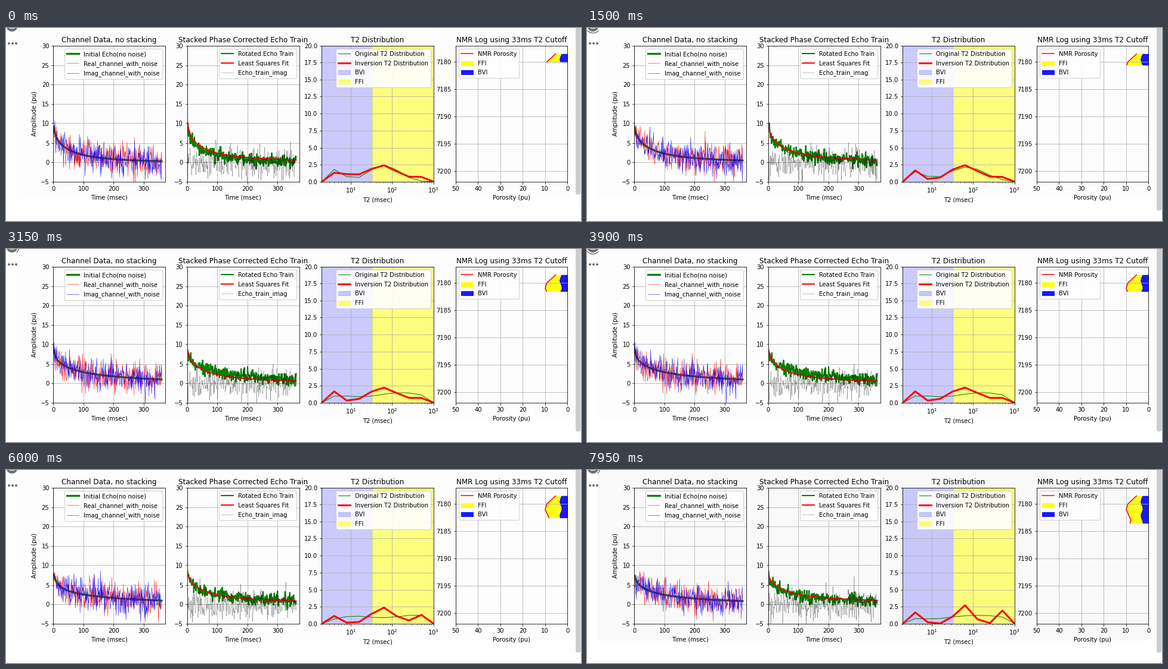
A matplotlib script that plays this animation: 964 px wide and 325 px high, repeating every 8 s.

```python
import numpy as np
import matplotlib.pyplot as plt
from matplotlib.animation import FuncAnimation
from matplotlib.patches import Arc, Circle, FancyBboxPatch, Rectangle
from matplotlib.transforms import IdentityTransform

W, H, DPI = 964, 325, 72
LOOP, TICK, STEP = 8000, 50, 150
FIRST_CHANGE, PERIOD = 700, 1075
STATES = 8

plt.rcParams.update({
    "font.family": "DejaVu Sans",
    "font.size": 10,
    "axes.titlesize": 12,
    "axes.labelpad": 4.7,
    "legend.labelspacing": 0.56,
    "legend.framealpha": 0.9,
    "toolbar": "None",
})

T2 = 2.0 ** np.arange(1, 11)
BINS = np.arange(8)
ECHO_TIME = 1.2 * np.arange(1, 301)

# Two humps of the true spectrum: height, bin and width of each, at key depths
KEY_STATES = [0, 2, 4, 6, 7]
KEY_HUMPS = np.array([
    [1.8, 0, 0.7, 2.5, 4, 1.2],
    [1.1, 0, 0.8, 1.85, 4.3, 1.7],
    [0.7, 0.5, 2, 1.15, 6.5, 2.8],
    [1.35, 2.3, 1.1, 1.4, 7, 1.9],
    [0.45, 0, 0.8, 1.25, 5, 3],
])


def hump(height, center, width):
    return height * np.exp(-((BINS - center) / width) ** 2 / 2)


def with_ends(amps):
    return np.concatenate(([0], amps, [0]))


def true_spectrum(k):
    p = [np.interp(k, KEY_STATES, column) for column in KEY_HUMPS.T]
    return with_ends(hump(*p[:3]) + hump(*p[3:]))


def fitted_spectrum(k):
    sharp = np.clip((k - 4) / 2, 0, 1)
    fast = hump(1.5 + 0.35 * np.cos(np.pi * (k - 2) / 3), 0, 0.5 + 0.9 * np.exp(-3 * k))
    middle = hump(2.4 + 0.06 * k * np.cos(np.pi * (k - 6.5) / 3), 3.9, 1.15 - 0.5 * sharp)
    slow = hump(0.65 + 1.3 * sharp, 7, 0.8 - 0.4 * sharp)
    return with_ends(fast + middle + slow)


def decay(spectrum):
    return np.exp(-ECHO_TIME[:, None] / T2) @ spectrum


def panel(fig, col, shade, title, xlabel):
    rect = [(79.4 + 224.5 * col) / W, (H - 258.9) / H, 187.1 / W, 227.9 / H]
    ax = fig.add_axes(rect, facecolor=shade)
    ax.set_title(title)
    ax.set_xlabel(xlabel)
    ax.grid(True)
    return ax


def time_axis(ax):
    ax.set(xlim=(0, 371), ylim=(-5, 30))
    ax.set_xticks([0, 100, 200, 300])
    ax.set_yticks(range(-5, 31, 5))
    ax.legend(loc="upper right")


def draw_plots(fig, k):
    rng = np.random.default_rng(40 + k)
    shade = "#fdfdfd" if k < 6 else "#f9f9f9"
    fig.add_artist(Rectangle((18, 38), 927, 287, color=shade, lw=0, zorder=-1,
                             transform=IdentityTransform()))

    def noise(sigma):
        return rng.normal(0, sigma, ECHO_TIME.size)

    true, fitted = true_spectrum(k), fitted_spectrum(k)
    echo = decay(true)

    ax = panel(fig, 0, shade, "Channel Data, no stacking", "Time (msec)")
    ax.set_ylabel("Amplitude (pu)")
    ax.plot(ECHO_TIME, echo, color="green", lw=3.2, label="Initial Echo(no noise)")
    ax.plot(ECHO_TIME, echo + noise(2), color="red", lw=0.5,
            label="Real_channel_with_noise")
    ax.plot(ECHO_TIME, echo + noise(2), color="blue", lw=0.5,
            label="Imag_channel_with_noise")
    time_axis(ax)

    ax = panel(fig, 1, shade, "Stacked Phase Corrected Echo Train", "Time (msec)")
    ax.plot(ECHO_TIME, echo + noise(0.8), color="green", lw=2.1,
            label="Rotated Echo Train")
    ax.plot(ECHO_TIME, decay(fitted), color="red", lw=2, label="Least Squares Fit")
    ax.plot(ECHO_TIME, noise(2), color="black", lw=0.6, ls=":",
            label="Echo_train_imag")
    time_axis(ax)

    ax = panel(fig, 2, shade, "T2 Distribution", "T2 (msec)")
    ax.set_xscale("log")
    ax.plot(T2, true, color="green", lw=1, label="Original T2 Distribution")
    ax.plot(T2, fitted, color="red", lw=3, label="Inversion T2 Distribution")
    ax.axvspan(2, 33, color="blue", alpha=0.2, label="BVI")
    ax.axvspan(33, 1000, color="yellow", alpha=0.5, label="FFI")
    ax.set(xlim=(2, 1000), ylim=(0, 20))
    ax.set_yticks(np.arange(0, 20.1, 2.5))
    ax.legend(loc="upper right")

    ax = panel(fig, 3, shade, "NMR Log using 33ms T2 Cutoff", "Porosity (pu)")
    row = np.arange(4 + k)
    depth = 7178.5 + 0.5 * row
    total = np.interp(row, [0, 3, 5, 9, 10], [5.3, 9.2, 9.9, 7.7, 8.2])
    bound = 2.95 + 0.5 * np.cos(1.2 * (row - 2))
    ax.plot(total, depth, color="red", lw=1.5, label="NMR Porosity")
    ax.fill_betweenx(depth, bound, total, color="yellow", alpha=0.9, label="FFI")
    ax.fill_betweenx(depth, 0, bound, color="blue", alpha=0.9, label="BVI")
    ax.set(xlim=(50, 0), ylim=(7202, 7177))
    ax.set_xticks(range(0, 51, 10))
    ax.set_yticks(range(7180, 7201, 5))
    ax.ticklabel_format(useOffset=False)
    ax.legend(loc="upper left")


def render(fig, k):
    fig.clear()
    draw_plots(fig, k)
    fig.canvas.draw()
    return np.array(fig.canvas.buffer_rgba())


# The tiny surplus keeps the pixel size from rounding down
fig = plt.figure(figsize=((W + 1e-6) / DPI, (H + 1e-6) / DPI), dpi=DPI, facecolor="white")

# The plots only change with depth, so each is rendered once
plots = [render(fig, k) for k in range(STATES)]
fig.clear()

stage = fig.add_axes([0, 0, 1, 1])
stage.axis("off")
picture = stage.imshow(plots[0], extent=(0, W, H, 0), aspect="auto",
                       interpolation="nearest")
stage.set(xlim=(0, W), ylim=(H, 0))

# Page furniture: stop button, busy ring, menu dots, scrollbar
stage.add_patch(Circle((10, -3.5), 9.5, color="#707070", lw=0))
stage.add_patch(Rectangle((6, -7), 8, 8, color="white", lw=0))
ring = stage.add_patch(Arc((10, -3.5), 24, 24, theta1=-50, theta2=50,
                           color="#757575", lw=1.5))
for x in (5, 11, 17):
    stage.add_patch(Circle((x, 26), 1.9, color="#666666", lw=0))
scrollbar = stage.add_patch(FancyBboxPatch((958.5, -20), 1.5, 297, lw=0, color="#cdcdcd",
                                           boxstyle="round,pad=3.5,rounding_size=3.5"))


def update(i):
    step = i * TICK // STEP
    k = max(0, (step * STEP - FIRST_CHANGE) // PERIOD + 1)
    picture.set_data(plots[k])
    # The ring turns a quarter each step, starting at the top
    ring.set_angle(90 * (step % 4) - 90)
    scrollbar.set_height(297 if k == 0 else 324)
    return picture, ring, scrollbar


anim = FuncAnimation(fig, update, frames=LOOP // TICK, interval=TICK,
                     repeat=True, repeat_delay=0, blit=False)
plt.show()
```
